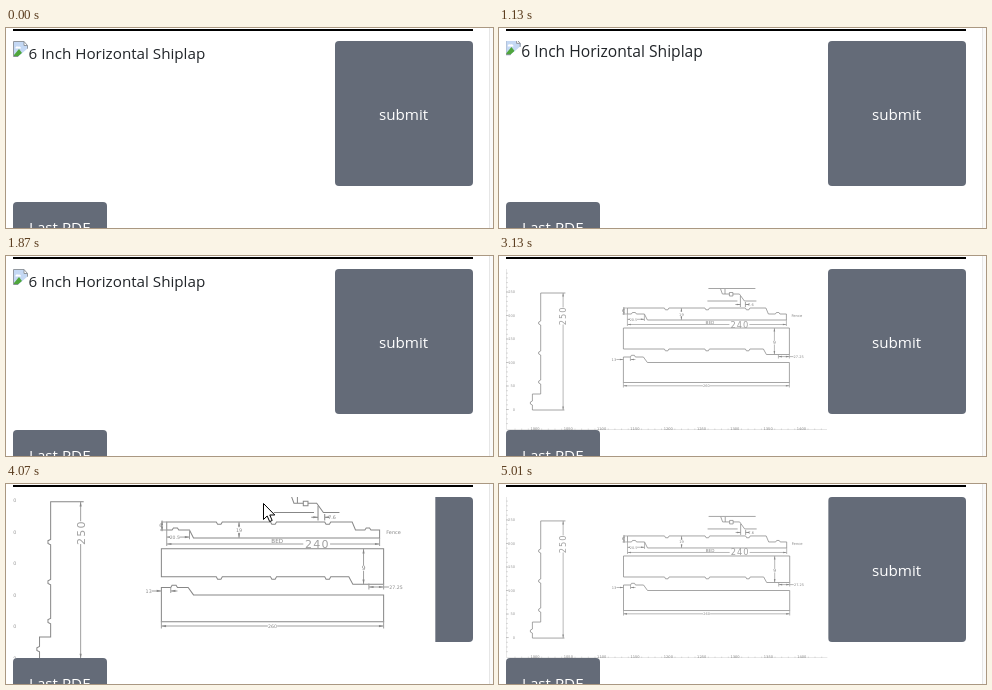
Recreate the animation shown at these times as an HTML page with a canvas. Size 487 by 200 pixels, loop 5.53 s.

```html
<!DOCTYPE html>
<html lang="en">
<head>
<meta charset="utf-8">
<title>Hover zoom</title>
<style>
html, body { margin: 0; width: 100%; height: 100%; overflow: hidden; background: #fff; }
canvas { display: block; }
</style>
</head>
<body>
<canvas id="stage" width="487" height="200"></canvas>
<script>
const ctx = document.getElementById('stage').getContext('2d');

const LOOP = 5530, STEP = 1000 / 15, LOADED = 3130;
const ZOOM = 0.4, FADE = 500;
const ORIGIN = { x: 33, y: 93.5 };
const BOX = { x: 7, y: 13, w: 322, h: 161 };
const HOVERS = [[250, 795], [3792, 4536.5]];
const UI_FONT = '15.2px "Open Sans", "Noto Sans", sans-serif';
const GREY = '#646b78', INK = '#878787', FAINT = '#a0a0a0';

// Pointer tracks: time, x, y
const TRACKS = [
  [[260, 270, 80], [530, 288, 94], [800, 305, 106], [867, 392, 148], [934, 466, 180]],
  [[3795, 244, 0], [3867, 249, 12], [4067, 257, 19], [4200, 292, 46], [4334, 352, 92],
   [4467, 428, 140], [4534, 460, 156], [4600, 479, 168], [4668, 485, 184]]
];

const clamp = v => Math.max(0, Math.min(1, v));

// CSS "ease": cubic-bezier(.25, .1, .25, 1)
function ease(p) {
  p = clamp(p);
  let lo = 0, hi = 1;
  for (let i = 0; i < 24; i++) {
    const u = (lo + hi) / 2, v = 1 - u;
    const x = 0.75 * v * v * u + 0.75 * v * u * u + u * u * u;
    if (x < p) lo = u; else hi = u;
  }
  const u = (lo + hi) / 2, v = 1 - u;
  return 0.3 * v * v * u + 3 * v * u * u + u * u * u;
}

function zoomAt(t) {
  return HOVERS.reduce((s, [a, b]) =>
    s + ZOOM * (ease((t - a) / FADE) - ease((t - b) / FADE)), 1);
}

function pointerAt(t) {
  for (const track of TRACKS) {
    for (let i = 1; i < track.length; i++) {
      const [t0, x0, y0] = track[i - 1], [t1, x1, y1] = track[i];
      if (t >= t0 && t <= t1) {
        const k = (t - t0) / (t1 - t0);
        return [x0 + (x1 - x0) * k, y0 + (y1 - y0) * k];
      }
    }
  }
  return null;
}

function text(str, x, y, font, color, align = 'left') {
  ctx.font = font;
  ctx.fillStyle = color;
  ctx.textAlign = align;
  ctx.fillText(str, x, y);
}

function button(x, y, w, h, label, baseline) {
  ctx.fillStyle = GREY;
  ctx.beginPath();
  ctx.roundRect(x, y, w, h, 4);
  ctx.fill();
  text(label, x + w / 2 - 0.5, baseline, '500 ' + UI_FONT, '#fff', 'center');
}

function stroke(d, color = INK, width = 0.75) {
  ctx.strokeStyle = color;
  ctx.lineWidth = width;
  ctx.stroke(new Path2D(d));
}

function note(str, x, y, size = 3.6, color = INK) {
  text(str, x, y, size + 'px "DejaVu Sans", sans-serif', color, 'center');
}

function bigNote(str, x, y) {
  ctx.letterSpacing = '0.9px';
  note(str, x + 0.45, y, 8.3, FAINT);
  ctx.letterSpacing = '0px';
}

function arrow(x, y, dx, dy) {
  ctx.fillStyle = INK;
  ctx.beginPath();
  ctx.moveTo(x, y);
  ctx.lineTo(x - 3.5 * dx + 0.8 * dy, y - 3.5 * dy + 0.8 * dx);
  ctx.lineTo(x - 3.5 * dx - 0.8 * dy, y - 3.5 * dy - 0.8 * dx);
  ctx.fill();
}

// Dimension line with an arrow at each end
function dim(x0, y0, x1, y1) {
  const dx = Math.sign(x1 - x0), dy = Math.sign(y1 - y0);
  stroke(`M${x0} ${y0}L${x1} ${y1}`, FAINT);
  arrow(x0, y0, -dx, -dy);
  arrow(x1, y1, dx, dy);
}

function gap(x, y, w, h) {
  ctx.fillStyle = '#fff';
  ctx.fillRect(x - w / 2, y - h / 2, w, h);
}

function axes() {
  stroke('M7.5 13V173.5H328', '#ccc', 0.5);
  for (let y = 17.2; y < 172; y += 4.7) stroke(`M7 ${y}h2`, '#bbb', 0.5);
  for (let x = 16; x < 328; x += 6.66) stroke(`M${x} 174v-1.5`, '#bbb', 0.5);
  for (let i = 0; i < 6; i++) {
    const y = 36 + i * 23.5;
    stroke(`M7 ${y}h3`, '#aaa', 0.5);
    text(String(250 - i * 50), 16, y + 1.3, '3.6px "DejaVu Sans", sans-serif', '#999', 'right');
  }
  for (let i = 0; i < 9; i++) {
    note(String(1000 + i * 50), 36 + i * 33.3, 174, 3.6, '#888');
  }
}

function sideView() {
  const bump = 'l-2 1v2l2 1';
  stroke(`M67 37H42.3V65${bump}V95${bump}V124${bump}V138H34V145l-2 1v2l2 1V154H66`);
  dim(64.7, 37, 64.7, 154);
  gap(64.7, 60, 6, 17);
  ctx.save();
  ctx.translate(67.7, 60.4);
  ctx.rotate(-Math.PI / 2);
  bigNote('250', 0, 0);
  ctx.restore();
}

function detail() {
  stroke('M222 32.5H257M210 32.5h12l2 5.5H231M226.6 33V38M234.5 38H241L246 45H258M209 45H239');
  stroke('M231 36.5h3.5v3.5h-3.5zM242 40V51M247 46V51M237 48.5H242M247 48.5H250');
  arrow(242, 48.5, 1, 0);
  arrow(247, 48.5, -1, 0);
  note('7.6', 252.5, 50);
}

function boards() {
  const dip = [166, 206.5, 247].map(x => `H${x}l1 1.8h2.5l1-1.8`).join('');
  stroke(`M129 52${dip}H267.5L270 58H277l1-1.5h2.5l1 1.5H288V64H149L146 58H138l-1-1.5h-3l-1 1.5H129Z`);
  stroke(`M291 72H125V93${dip}H265L268 98.5H291Z`);
  stroke('M125 101H132l1-1.7h3l1 1.7H145L149 106.5H291V126.5H125Z');
}

function dims() {
  stroke('M129 58V70M288 64V70M125 126V131.5M291 126V131.5M146 58V65M125 52h4M124 58h5', FAINT);
  dim(129, 68.5, 288, 68.5);
  gap(241, 68.5, 20, 4);
  note('BED', 211.5, 67.8, 4.2);
  bigNote('240', 241, 71.5);
  dim(129, 63.3, 146, 63.3);
  gap(135, 63.3, 7, 3);
  note('20.5', 135, 64.7, 3.4);
  dim(125.5, 51, 125.5, 59);
  note('6', 124.5, 56);
  dim(183, 52, 183, 64);
  gap(183, 58, 3, 4);
  note('19', 183, 59.5);
  note('Fence', 298.4, 61, 3.7);
  dim(276, 72, 276, 98.5);
  gap(276, 86.5, 3, 4);
  note('9', 276, 88, 4.5);
  stroke('M280 98V102.5M291 98V102.5', FAINT);
  dim(280, 100.6, 291, 100.6);
  stroke('M291 100.6H295', FAINT);
  note('27.25', 300.2, 102, 3.5);
  stroke('M118 103.5H125M132 103.5H137M132 101V105', FAINT);
  arrow(125, 103.5, 1, 0);
  arrow(132, 103.5, -1, 0);
  note('13', 115.5, 105);
  dim(125, 129.8, 291, 129.8);
  gap(208, 129.8, 7, 3);
  note('260', 208, 131.1, 3.5);
}

function drawing() {
  ctx.fillStyle = '#fff';
  ctx.fillRect(BOX.x, BOX.y, BOX.w, BOX.h);
  axes();
  ctx.translate(-0.6, 0);
  sideView();
  detail();
  boards();
  dims();
}

function fill(d, color) {
  ctx.fillStyle = color;
  ctx.fill(new Path2D(d));
}

function missing() {
  fill('M7.5 13.5H18L22 17.5V21L12 29H7.5Z', '#c4d8f4');
  fill('M8 27L13 21L16 25L12 28.5H8Z', '#4fa63c');
  fill('M9.5 20.5a1.6 1.6 0 0 1 2.5-1.8a2 2 0 0 1 3 1.8z', '#fff');
  fill('M18 13.5V17.5H22Z', '#fff');
  stroke('M12 28.5H7.5V13.5H18L21.5 17.5V21M18 13.5V17.5H21.5', '#8a8f96', 0.9);
  stroke('M22 21L13 29', '#fff', 1.5);
  text('6 Inch Horizontal Shiplap', 22.5, 31, UI_FONT, '#212529');
}

function pointer([x, y]) {
  ctx.save();
  ctx.translate(x, y);
  const shape = 'M.5 .5V16.5L4.2 13L6.7 18.6L9.2 17.5L6.8 12H11.8Z';
  fill(shape, '#fff');
  stroke(shape, '#000', 1);
  ctx.restore();
}

function draw(t) {
  ctx.fillStyle = '#fff';
  ctx.fillRect(0, 0, 487, 200);
  ctx.fillStyle = '#fafafa';
  ctx.fillRect(484, 0, 3, 200);
  ctx.fillStyle = '#e6e6e6';
  ctx.fillRect(483, 0, 1, 200);
  ctx.fillStyle = '#000';
  ctx.fillRect(7, 1, 460, 2);
  button(329, 13, 138, 145, 'submit', 92);

  const s = zoomAt(t);
  ctx.save();
  ctx.beginPath();
  ctx.rect(BOX.x, BOX.y, 480, BOX.h);
  ctx.clip();
  ctx.translate(ORIGIN.x, ORIGIN.y);
  ctx.scale(s, s);
  ctx.translate(-ORIGIN.x, -ORIGIN.y);
  if (t >= LOADED) drawing(); else missing();
  ctx.restore();

  button(7, 174, 94, 38, 'Last PDF', 205);
  const p = pointerAt(t);
  if (p) pointer(p);
}

function tick() {
  const t = performance.now() % LOOP;
  draw(Math.floor((t + 7) / STEP) * STEP);
  requestAnimationFrame(tick);
}
tick();
</script>
</body>
</html>
```
